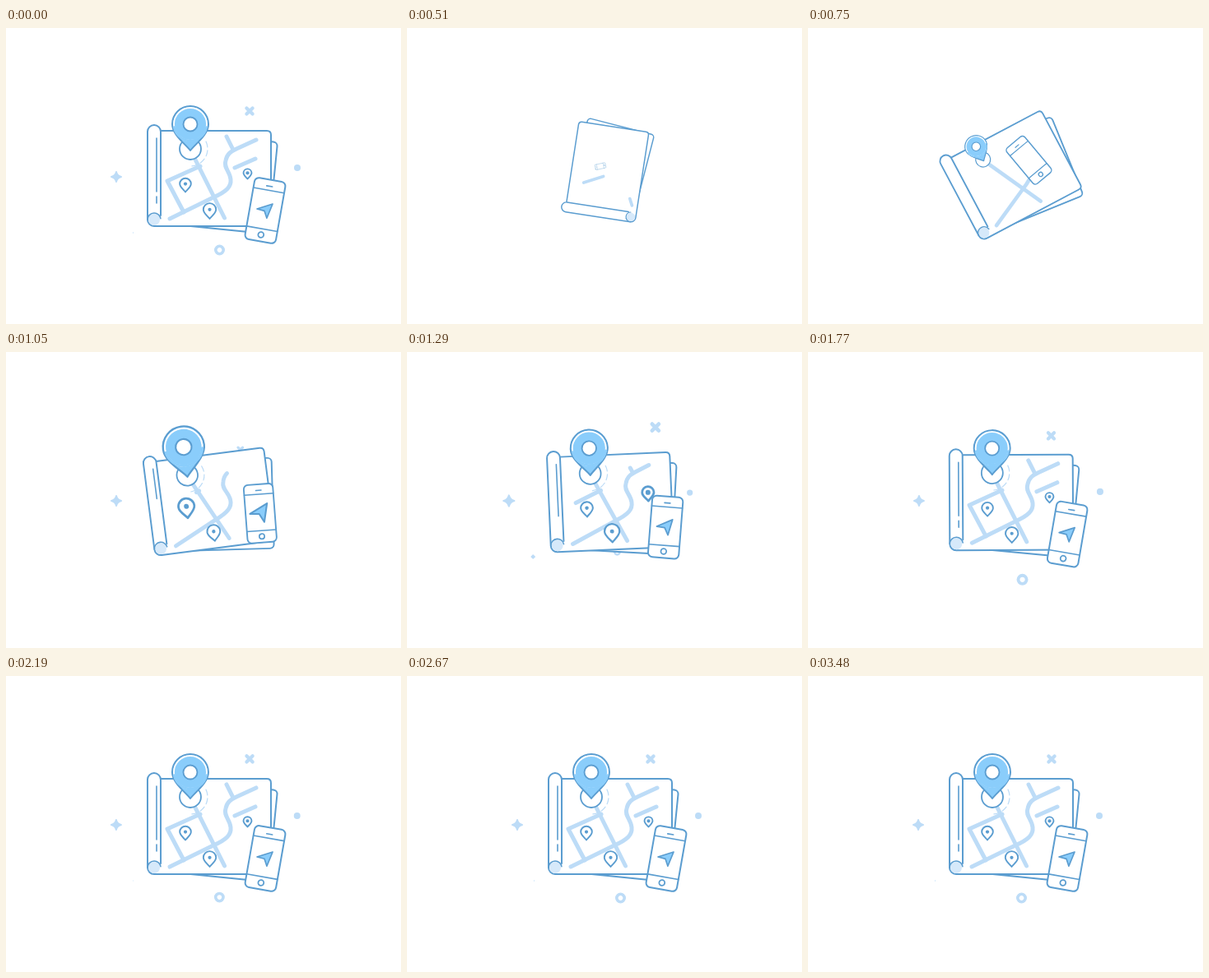
Recreate the animation shown at these times as an HTML page with a canvas. Size 480x360 px, loop 3510 ms.

```html
<!DOCTYPE html>
<html>
<head>
<meta charset="utf-8">
<style>
html, body { margin: 0; width: 100%; height: 100%; overflow: hidden; background: #fff; }
canvas { display: block; }
</style>
</head>
<body>
<canvas id="stage" width="480" height="360"></canvas>
<script>
const ctx = document.getElementById('stage').getContext('2d');
const LOOP = 3510, STEP = 30;
const LINE = '#5b9dd0', PALE = '#bddcf7', SHADE = '#d6e9fa', FILL = '#8acdfb', WHITE = '#fff';
const rad = deg => deg * Math.PI / 180;

// Easing
const clamp = x => Math.max(0, Math.min(1, x));
const part = (t, start, dur) => clamp((t - start) / dur);
const quadOut = p => 1 - (1 - p) ** 2;
const smooth = p => p * p * (3 - 2 * p);

// Rise past full size, then relax back to it.
function pop(t, start, peak, k = 1) {
  const rise = part(t, start, 250 * k), fall = part(t, start + 250 * k, 400 * k);
  return rise < 1 ? peak * Math.sin(rise * Math.PI / 2) : 1 + (peak - 1) * (1 - fall) ** 2;
}

function spring(t, start, k = 1) {
  const s = Math.max(0, t - start) * k / 1000;
  return 1 - Math.exp(-5 * s) * Math.cos(6.54 * s);
}

// Smooth curve through values at given times.
function track(t, times, values) {
  const n = times.length - 1;
  if (t <= times[0]) return values[0];
  if (t >= times[n]) return values[n];
  let i = 0;
  while (t > times[i + 1]) i++;
  const slope = j => j === n ? 0 : j === 0
    ? (values[1] - values[0]) / (times[1] - times[0])
    : (values[j + 1] - values[j - 1]) / (times[j + 1] - times[j - 1]);
  const h = times[i + 1] - times[i], p = (t - times[i]) / h, q = smooth(p);
  return values[i] * (1 - q) + values[i + 1] * q
    + h * p * (1 - p) * ((1 - p) * slope(i) - p * slope(i + 1));
}

// Drawing helpers
function at(x, y, scale, deg, draw) {
  if (scale < 0.01) return;
  ctx.save();
  ctx.translate(x, y);
  ctx.rotate(rad(deg));
  ctx.scale(scale, scale);
  draw();
  ctx.restore();
}

function paint(path, fill, stroke, width = 2) {
  if (fill) { ctx.fillStyle = fill; ctx.fill(path); }
  if (stroke) { ctx.strokeStyle = stroke; ctx.lineWidth = width; ctx.stroke(path); }
}

function arc(x, y, r, from = 0, to = 360) {
  const path = new Path2D();
  path.arc(x, y, r, rad(from), rad(to));
  return path;
}

function box(x, y, w, h, r) {
  const path = new Path2D();
  path.roundRect(x, y, w, h, r);
  return path;
}

function grow(road, progress) {
  if (progress <= 0) return;
  ctx.setLineDash([road.length * progress, 999]);
  paint(road.path, null, PALE, 5);
  ctx.setLineDash([]);
}

const road = (d, length) => ({ path: new Path2D(d), length });
const roads = {
  avenue: road('M224 148L265.5 231', 94),
  river: road('M199 232L252 206C268 199 274 193 273 184C272 174 264 170 267 161C269 152 274 150 280 147L304 136', 163),
  block: road('M236 168L196 186L216 224', 88),
  upper: road('M276 148L268 132', 18),
  lower: road('M278 170L303 159', 28)
};
const sheet = new Path2D('M188 125H317Q322 125 322 130V236Q322 241 317 241H180A8 8 0 0 1 172 233V126A8 8 0 0 1 188 126V228');
const pinShape = new Path2D('M0 0C-6 -8 -22 -19 -22 -32A22 22 0 0 1 22 -32C22 -19 6 -8 0 0Z');
const arrow = new Path2D('M7.5 -9.4L-10.2 -.2L-1 .5L3.5 8.8Z');
const sparkle = new Path2D('M0 -6Q1.2 -1.2 6 0Q1.2 1.2 0 6Q-1.2 1.2 -6 0Q-1.2 -1.2 0 -6Z');
const cross = new Path2D('M-3.6 -3.6L3.6 3.6M3.6 -3.6L-3.6 3.6');

function ornament(t, start, x, y, draw, k = 1) {
  if (t <= start) return;
  const s = spring(t, start, k);
  at(246 + (x - 246) * s, 181 + (y - 181) * s, s, 0, draw);
}

function drawOrnaments(t) {
  ornament(t, 810, 134, 181, () => paint(sparkle, PALE, PALE, 2));
  ornament(t, 890, 296, 101, () => paint(cross, null, PALE, 4.2));
  ornament(t, 1090, 354, 170, () => paint(arc(0, 0, 4), PALE));
  ornament(t, 1108, 259.5, 270, () => paint(arc(0, 0, 4.7), null, PALE, 3.6), 0.77);
  const speck = track(t, [1130, 1290, 1600, 1900, 2300], [0, 3, 0, 0, 0.8]);
  at(155 - speck * 0.6, 249, speck, 45, () => paint(box(-0.7, -0.7, 1.4, 1.4, 0.2), PALE));
}

function smallPin(x, y, size, growth) {
  at(x, y, growth, 0, () => {
    const head = -32 * size;
    ctx.save();
    ctx.scale(size, size);
    paint(pinShape, WHITE, LINE, 1.9 / size);
    ctx.restore();
    paint(arc(0, head, 2.1), LINE);
  });
}

function drawMap(t) {
  at(330, 139, 1, 5.7, () => paint(box(-130, 0, 130, 112, 5), WHITE, LINE));
  paint(sheet, WHITE, LINE);

  paint(arc(180, 233, 7), SHADE);
  paint(arc(180, 233, 8, 180, 350), null, LINE, 1.6);
  const crease = 79 * quadOut(part(t, 820, 850));
  if (crease > 0) {
    const fold = new Path2D();
    fold.moveTo(183, 134);
    fold.lineTo(183, 134 + Math.min(65, crease));
    if (crease > 71) { fold.moveTo(183, 205); fold.lineTo(183, 134 + crease); }
    paint(fold, null, LINE, 1.6);
  }

  grow(roads.avenue, quadOut(part(t, 450, 300)));
  grow(roads.river, quadOut(part(t, 470, 1080)));
  grow(roads.block, smooth(part(t, 950, 800)));
  grow(roads.upper, part(t, 1200, 250));
  grow(roads.lower, part(t, 1350, 250));

  smallPin(218, 199.5, 0.31, pop(t, 810, 1.45));
  smallPin(247.5, 232, 0.35, pop(t, 915, 1.4));
  smallPin(293.5, 183.5, 0.225, pop(t, 1040, 1.45));

  if (t > 960) {
    ctx.setLineDash([7, 4]);
    paint(arc(224, 147, 21, -25, 95), null, PALE, 1.2);
    ctx.setLineDash([]);
  }
  at(224, 147, quadOut(part(t, 600, 300)), 0, () => paint(arc(0, 0, 13), WHITE, LINE, 1.8));
  at(224, 149, pop(t, 632, 1.24, 1.3), 0, () => {
    paint(pinShape, FILL, LINE);
    paint(arc(0, -32, 20), null, WHITE, 1.8);
    paint(arc(0, -32, 20, 10, 170), null, FILL, 2.6);
    paint(arc(0, -32, 8.5), WHITE, LINE, 1.8);
  });
}

function drawPhone(t) {
  const times = [425, 750, 1050, 1290, 1540];
  const x = track(t, times, [247, 277, 307.4, 313, 315]);
  const y = track(t, times, [170, 176, 205.4, 216.5, 222]);
  const tilt = track(t, times, [-24, -12, 3, 7, 10]);
  const size = track(t, times, [0, 0.81, 0.95, 0.99, 1]);
  at(x, y, size, tilt, () => {
    paint(box(-19, -38, 38, 76, 5.5), WHITE, LINE);
    paint(new Path2D('M-19 -25H19M-19 22.5H19'), null, LINE, 1.6);
    paint(new Path2D('M-3.5 -30H3.5'), null, LINE, 1.6);
    paint(arc(0, 30, 3.4), null, LINE, 1.8);
    at(0, 0, pop(t, 820, 1.32), 0, () => paint(arrow, FILL, LINE, 1.7));
  });
}

function render(now) {
  let t = Math.floor(now % LOOP / STEP) * STEP;
  if (t < STEP) t = LOOP;
  ctx.fillStyle = WHITE;
  ctx.fillRect(0, 0, 480, 360);
  if (t < 270) return;
  ctx.lineCap = ctx.lineJoin = 'round';
  drawOrnaments(t);
  const s = (t - 240) / 1000;
  at(240, 180, 1 - Math.exp(-5 * s), -270 * Math.exp(-4.45 * s), () => {
    ctx.translate(-240, -180);
    drawMap(t);
    drawPhone(t);
  });
}

function tick() {
  render(performance.now());
  requestAnimationFrame(tick);
}
tick();
</script>
</body>
</html>
```
